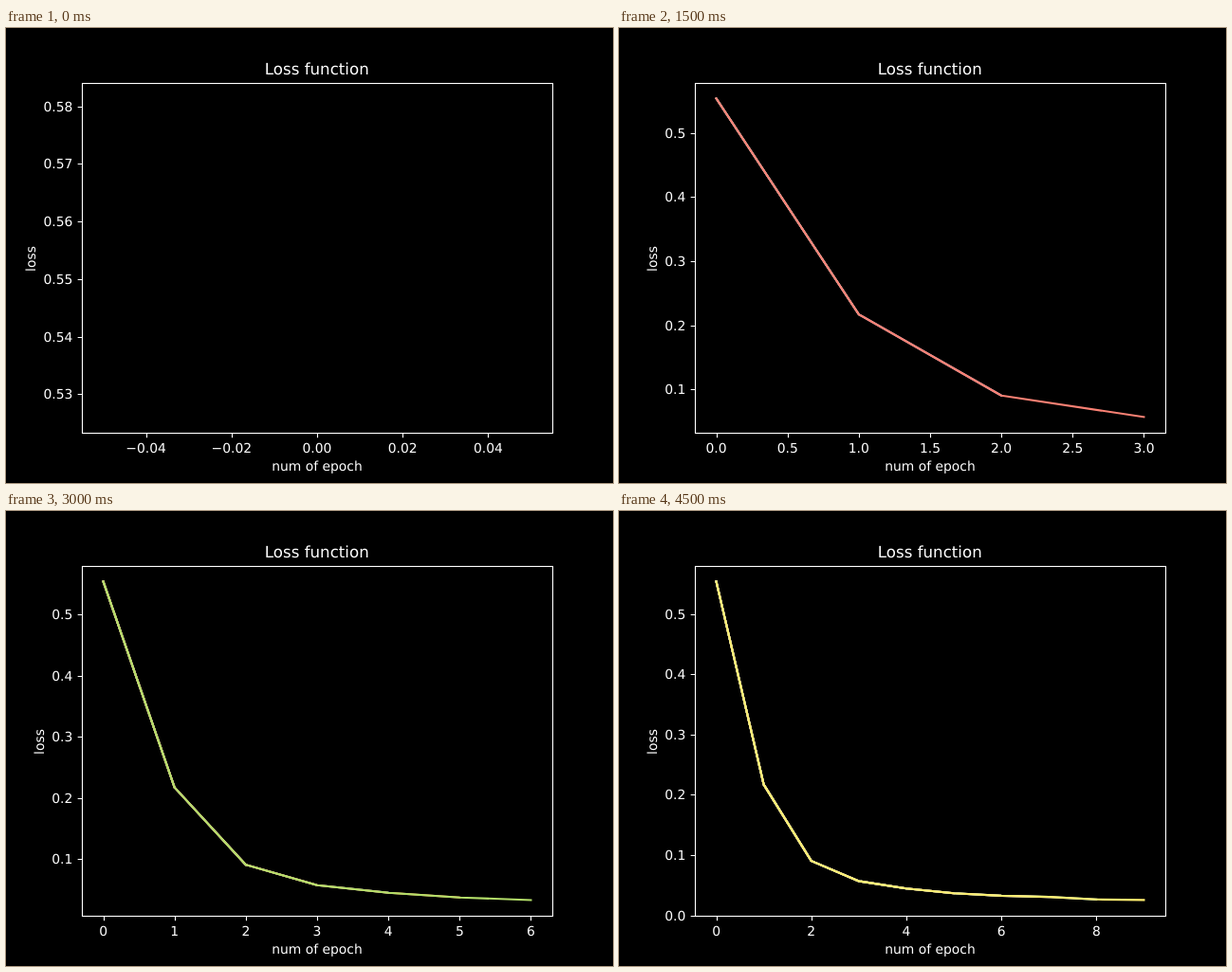
Write an HTML page that moves like this. It is 640 px wide and 480 px high and loops after 5000 ms.

```html
<!DOCTYPE html>
<html lang="en">
<head>
<meta charset="utf-8">
<title>Loss function</title>
<style>
  html, body { margin: 0; width: 100%; height: 100%; overflow: hidden; background: #000; }
  svg { display: block; width: 640px; height: 480px; }
  text {
    font: 13.889px "DejaVu Sans", sans-serif;
    fill: #fff;
    text-anchor: middle;
    text-rendering: geometricPrecision;
  }
  .title { font-size: 16.667px; }
  .tick-y { text-anchor: end; }
  .axes { fill: none; stroke: #fff; stroke-width: 1.11; }
  .curve { fill: none; stroke-width: 2.083; stroke-linecap: square; stroke-linejoin: round; }
</style>
</head>
<body>
<svg viewBox="0 0 640 480">
  <rect class="axes" x="80.5" y="58.5" width="496" height="369"/>
  <text class="title" x="327.8" y="49">Loss function</text>
  <text x="328" y="467">num of epoch</text>
</svg>
<script>
const STEP_MS = 500;
const LOSSES = [0.5537, 0.217, 0.0905, 0.057, 0.0447, 0.0369, 0.0328, 0.0308, 0.0266, 0.0257];
const COLORS = ["#8dd3c7", "#feffb3", "#bfbbd9", "#fa8174", "#81b1d2",
                "#fdb462", "#b3de69", "#bc82bd", "#ccebc4", "#ffed6f"];
const BOX = { left: 80, right: 576, top: 57.6, bottom: 427.2 };
const svg = document.querySelector("svg");

function add(parent, tag, attrs, text = "") {
  const node = document.createElementNS(svg.namespaceURI, tag);
  for (const [key, value] of Object.entries(attrs)) node.setAttribute(key, value);
  node.textContent = text;
  parent.append(node);
  return node;
}

// Data range plus a 5% margin; a single value is widened first.
function limits(low, high) {
  if (low === high) {
    const spread = Math.abs(low) * 0.05 || 0.05;
    low -= spread;
    high += spread;
  }
  const margin = (high - low) * 0.05;
  return [low - margin, high + margin];
}

const scale = ([low, high], from, to) => v => from + (v - low) / (high - low) * (to - from);

// Smallest round step that gives at most nine intervals.
function ticks([low, high]) {
  const raw = (high - low) / 9;
  const power = 10 ** Math.floor(Math.log10(raw));
  const step = Number(([1, 2, 2.5, 5, 10].find(m => m * power >= raw) * power).toPrecision(2));
  const decimals = (String(step).split(".")[1] || "").length;
  const marks = [];
  for (let i = Math.ceil(low / step); i * step <= high; i++) {
    const value = i * step || 0;
    marks.push({ value, label: value.toFixed(decimals).replace("-", "\u2212") });
  }
  return { marks, decimals };
}

function buildPlot(last) {
  const group = add(svg, "g", { visibility: "hidden" });
  const values = LOSSES.slice(0, last + 1);
  const xRange = limits(0, last);
  const yRange = limits(Math.min(...values), values[0]);
  const toX = scale(xRange, BOX.left, BOX.right);
  const toY = scale(yRange, BOX.bottom, BOX.top);
  const yTicks = ticks(yRange);
  let path = "";

  for (const { value, label } of ticks(xRange).marks) {
    const x = toX(value);
    path += `M${Math.round(x) + 0.5} 427.5v4.86`;
    add(group, "text", { x, y: 448 }, label);
  }
  for (const { value, label } of yTicks.marks) {
    const y = Math.round(toY(value));
    path += `M80.5 ${y + 0.5}h-4.86`;
    add(group, "text", { class: "tick-y", x: 70.3, y: y + 5 }, label);
  }
  add(group, "path", { class: "axes", d: path });

  const labelX = yTicks.decimals === 2 ? 31 : 40;
  add(group, "text", { transform: `translate(${labelX} 243.5) rotate(-90)` }, "loss");

  // Each epoch's curve is laid over the earlier ones.
  for (let end = 1; end <= last; end++) {
    const points = values.slice(0, end + 1).map((v, i) => `${toX(i)},${toY(v)}`).join(" ");
    add(group, "polyline", { class: "curve", points, stroke: COLORS[end] });
  }
  return group;
}

const plots = LOSSES.map((_, i) => buildPlot(i));
const start = performance.now();
let shown = -1;

function render(now) {
  const index = Math.floor(Math.max(0, now - start) / STEP_MS) % plots.length;
  if (index !== shown) {
    plots.forEach((plot, i) => plot.setAttribute("visibility", i === index ? "visible" : "hidden"));
    shown = index;
  }
  requestAnimationFrame(render);
}
render(start);
</script>
</body>
</html>
```
